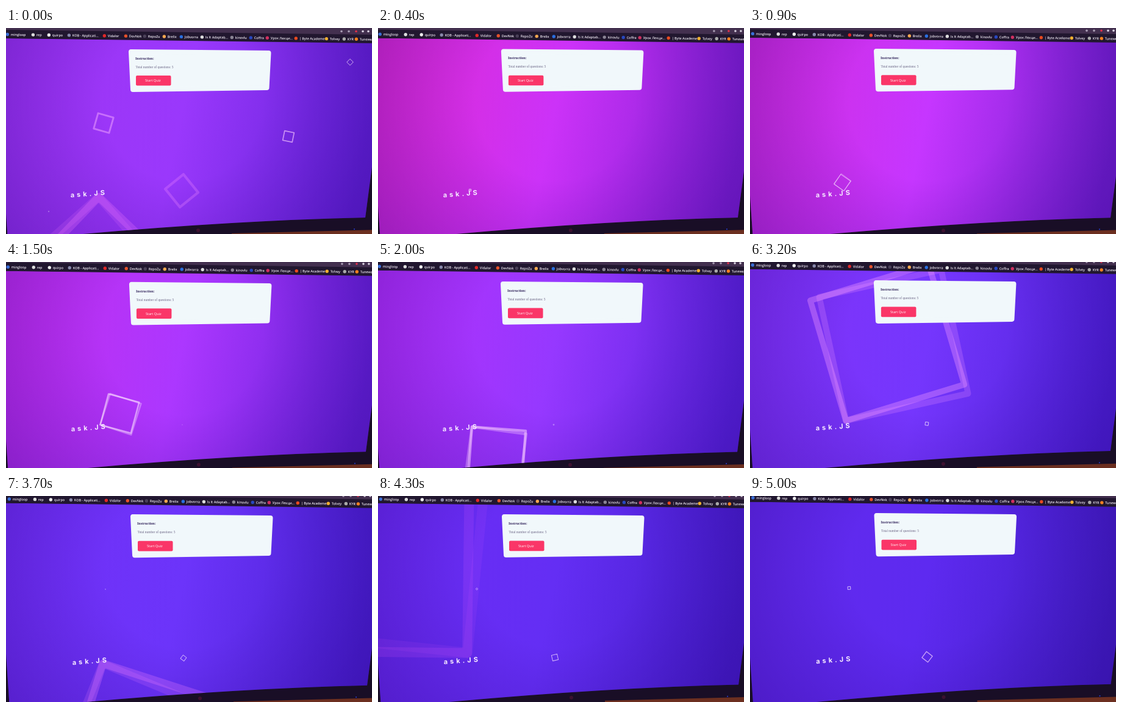
Recreate the animation shown at these times as an HTML page with a canvas. Size 600 px wide and 338 px high, loop 5.1 s.

```html
<!DOCTYPE html>
<html lang="en">
<head>
<meta charset="utf-8">
<title>Quiz page on a curved monitor</title>
<style>
  html, body { margin: 0; height: 100%; overflow: hidden; background: #140d1e; }
  canvas { display: block; }
</style>
</head>
<body>
<canvas id="stage" width="600" height="338"></canvas>
<script>
const ctx = document.getElementById('stage').getContext('2d');
const LOOP = 5100, STEP = 100, RELOAD = 0.1;

// time, camera shift: x, y near the top, y near the bottom; page colours left, middle, right
const keys = [
  [0, 0, 0, 0, '9e34f2', '9a38fc', '6422d8'],
  [0.1, 0.2, 0, 0, 'e628c8', 'd030f4', '8a20d8'],
  [0.9, 2, -1, 0, 'd42cdc', 'c636ff', '7620d2'],
  [2, 0, -3, 0, 'b430fa', '9638ff', '5a24e0'],
  [2.8, 1, -5, -2, '8e36fa', '7c38ff', '5022dc'],
  [3.7, 3, -5, -1, '7230f6', '6c34fa', '4a20d2'],
  [4.3, 2, -5, -2, '6c2cf4', '642ef4', '461ecc'],
  [5, 2.5, -7, -3, '622aec', '5e2af0', '421ec6'],
];

// x, text, icon colour
const bookmarks = [
  [8, 'mingloop', '#3b6fd8'], [50, 'rep', '#ddd'], [76, 'quirpo', '#eee'],
  [109, 'KOB - Applicati...', '#8888aa'], [167, 'Vidalor', '#e02828'],
  [202, 'DevNok', '#e6512a'], [233, 'RepoZu', '#4a4058'], [265, 'Brelix', '#f5a850'],
  [293, 'Jobvorra', '#2a6fe0'], [327, 'Is It Adaptab...', '#ddd'], [376, 'kinovlu', '#8a8494'],
  [407, 'Coffra', '#2848c0'], [434, 'Урок Лекци...', '#d03060'],
  [481, '| Byte Academe', '#e84a20'], [531, 'Tolvey', '#f0b030'],
  [560, 'KYR', '#aaa'], [580, 'Tunewell', '#f58020'],
];

// Each cube starts two seconds after the one before
const cubes = [[288, 267], [160, 156], [463, 178], [564, 56], [70, 301]];

const mix = (a, b, k) => a + (b - a) * k;

function mixHex(a, b, k) {
  const part = i => Math.round(mix(parseInt(a.substr(i, 2), 16), parseInt(b.substr(i, 2), 16), k));
  return `rgb(${part(0)},${part(2)},${part(4)})`;
}

// cubic-bezier(.42, 0, 1, 1)
function easeIn(x) {
  let lo = 0, hi = 1;
  const y = u => u * u * (3 - 2 * u);
  for (let i = 0; i < 24; i++) {
    const u = (lo + hi) / 2;
    if (1.26 * u * (1 - u) ** 2 + y(u) < x) lo = u; else hi = u;
  }
  return y(lo);
}

function poly(points, color) {
  ctx.beginPath();
  points.forEach(p => ctx.lineTo(...p));
  ctx.closePath();
  ctx.fillStyle = color;
  ctx.fill();
}

function dot(x, y, r, color) {
  ctx.beginPath();
  ctx.arc(x, y, r, 0, 7);
  ctx.fillStyle = color;
  ctx.fill();
}

function label(text, x, y, font, color) {
  ctx.font = font;
  ctx.fillStyle = color;
  ctx.fillText(text, x, y);
}

// Square outline turned about (x, y); its box begins at (from, from)
function outline(x, y, angle, from, size, width, color) {
  ctx.save();
  ctx.translate(x, y);
  ctx.rotate(angle * Math.PI / 180);
  ctx.lineWidth = width;
  ctx.strokeStyle = color;
  ctx.strokeRect(from + width / 2, from + width / 2, size - width, size - width);
  ctx.restore();
}

function drawCubes(age) {
  cubes.forEach(([x, y], i) => {
    const life = (age - 2 * i) / 12;
    if (life <= 0) return;
    const v = easeIn(life), size = 60 * v;
    if (size < 1) return;
    const alpha = 0.85 * (1 - v) * Math.min(1, size / 5);
    const color = `rgba(255,${255 - 150 * v},255,${alpha})`;
    outline(x, y, 960 * v, -size / 2, size, Math.max(0.9, size / 10), color);
  });
}

// Large square swinging about its corner, with a blurred second exposure
function drawSwing(age) {
  for (const [lead, weight] of [[0, 0.65], [0.018, 0.4]]) {
    const v = easeIn((age + lead) % 6 / 6), size = 620 * v;
    const alpha = Math.max(0, 1 - 1.45 * v) * weight;
    const color = `rgba(255,${255 - 270 * v},255,${alpha})`;
    outline(152, 268, 172 + 1288 * v, 0, size, Math.max(0.9, size / 22), color);
  }
}

function drawPage(colors, age) {
  ctx.save();
  ctx.beginPath();
  ctx.moveTo(-10, 17);
  ctx.lineTo(610, 22);
  ctx.lineTo(601, 220);
  ctx.lineTo(589, 311);
  ctx.quadraticCurveTo(330, 317, 20, 348);
  ctx.lineTo(3, 348);
  ctx.lineTo(-3, 260);
  ctx.lineTo(-10, 200);
  ctx.clip();

  const tint = ctx.createLinearGradient(0, 20, 600, 150);
  colors.forEach((c, i) => tint.addColorStop([0, 0.5, 1][i], c));
  ctx.fillStyle = tint;
  ctx.fillRect(-10, 0, 620, 360);
  const shade = ctx.createRadialGradient(290, 120, 130, 290, 120, 400);
  shade.addColorStop(0, 'rgba(40,0,130,0)');
  shade.addColorStop(1, 'rgba(40,0,130,.4)');
  ctx.fillStyle = shade;
  ctx.fillRect(-10, 0, 620, 360);

  drawCubes(age);
  drawSwing(age);
  ctx.restore();
}

function drawCard() {
  ctx.lineJoin = 'round';
  ctx.lineWidth = 8;
  ctx.strokeStyle = '#f1f8fb';
  poly([[205, 39], [430.5, 41], [427.5, 98], [208, 101]], '#f1f8fb');
  ctx.stroke();
  label('Instruction:', 212, 51.5, 'bold 6px "Liberation Serif", serif', '#3a2d62');
  label('Total number of questions: 5', 212.5, 65.5, '5.4px "Liberation Serif", serif', '#6a6484');
  ctx.beginPath();
  ctx.roundRect(213, 78, 57.5, 16.5, 2);
  ctx.fillStyle = '#fa3668';
  ctx.fill();
  label('Start Quiz', 228, 88.3, '5.6px "Open Sans", sans-serif', '#fff');
}

function drawBrowser() {
  ctx.save();
  ctx.rotate(0.0135);
  ctx.fillStyle = '#21172f';
  ctx.fillRect(-20, -20, 660, 37);
  ctx.fillStyle = '#43304f';
  ctx.fillRect(-20, -20, 660, 23);
  for (const [x, text, color] of bookmarks) {
    dot(x - 5.5, 10.5, 2.7, color);
    label(text, x, 12.6, '600 5.4px "Open Sans", sans-serif', '#f4eef8');
  }
  ctx.restore();
  [[550, '#a89cb4'], [562, '#a89cb4'], [574, '#e0304c'], [585, '#d8d0e0'], [594, '#d8d0e0']]
    .forEach(([x, color]) => dot(x, 5.5, 1.8, color));
}

function drawLogoText() {
  ctx.save();
  ctx.translate(106, 278);
  ctx.rotate(-0.075);
  ctx.letterSpacing = '4px';
  label('ask.JS', 0, 0, '700 11px Inter, sans-serif', '#f6eaff');
  ctx.restore();
}

function render(t) {
  let i = keys.findIndex(k => k[0] > t) - 1;
  if (i < 0) i = keys.length - 2;
  const a = keys[i], b = keys[i + 1];
  const k = Math.min(1, (t - a[0]) / (b[0] - a[0]));
  const [dx, top, bottom] = [1, 2, 3].map(n => mix(a[n], b[n], k));
  const colors = [4, 5, 6].map(n => mixHex(a[n], b[n], k));
  const age = t < RELOAD ? t + 9.75 : t - 0.05;

  ctx.setTransform(1, 0, 0, 1, 0, 0);
  ctx.fillStyle = '#190e26';
  ctx.fillRect(0, 0, 600, 338);
  const scale = 1 + (bottom - top) / 230;
  ctx.setTransform(1, 0, 0, scale, dx, top - 40 * (scale - 1));

  drawPage(colors, age);
  drawCard();
  drawLogoText();
  drawBrowser();
  dot(315, 332, 3, '#3d1130');
  dot(571, 330, 1, '#2c3fd0');
  poly([[370, 337], [610, 331], [610, 350], [370, 350]], '#6c2f20');
}

function tick() {
  const ms = performance.now() % LOOP;
  render(Math.floor(ms / STEP) * STEP / 1000);
  requestAnimationFrame(tick);
}
tick();
</script>
</body>
</html>
```
